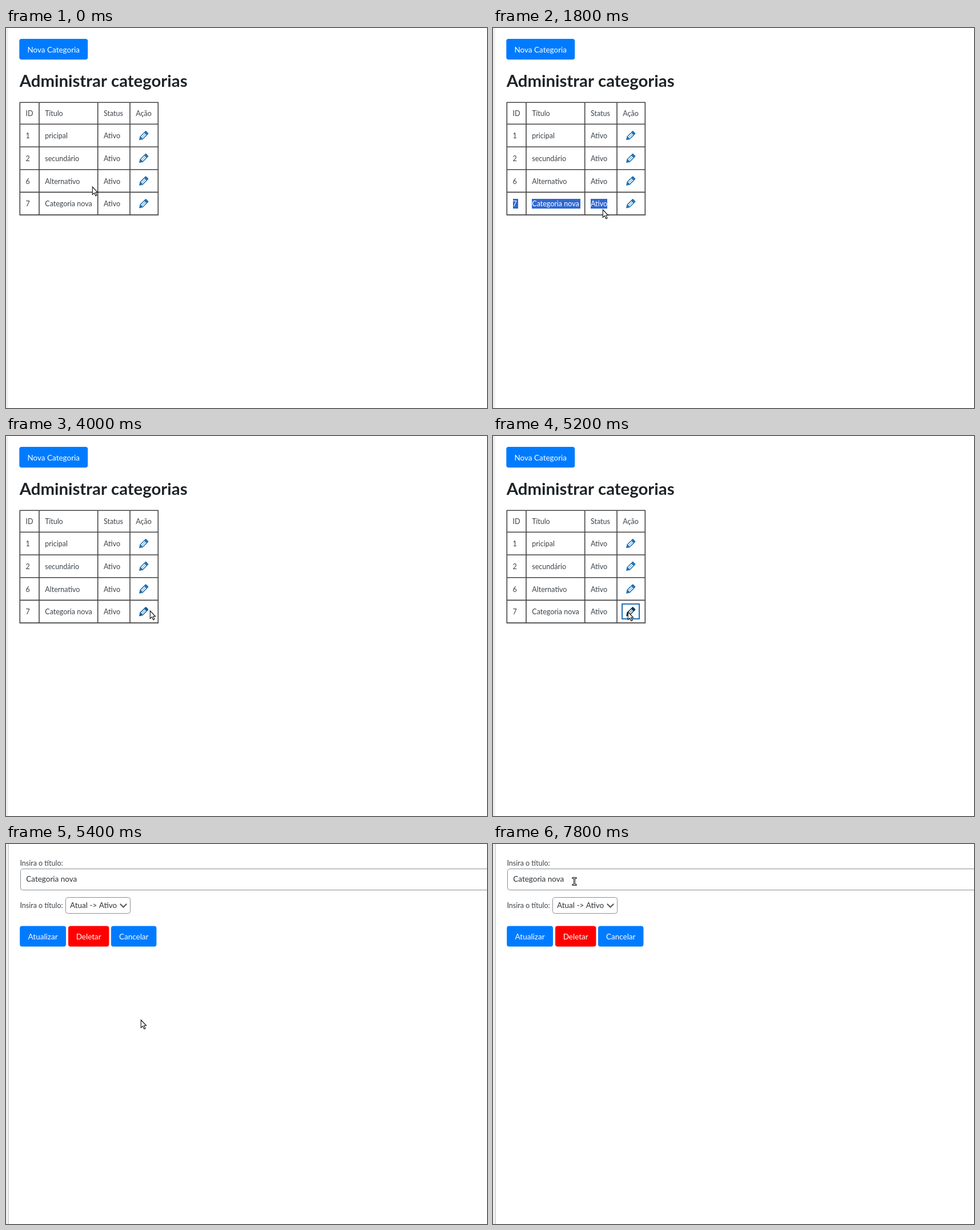
Recreate the animation shown at these times as an HTML page with a canvas. Size 842x665 px, loop 8000 ms.

```html
<!DOCTYPE html>
<html lang="pt">
<head>
<meta charset="utf-8">
<title>Administrar categorias</title>
<style>
html, body { margin: 0; width: 100%; height: 100%; overflow: hidden; background: #fff; }
canvas { display: block; }
</style>
</head>
<body>
<canvas id="stage" width="842" height="665"></canvas>
<script>
const ctx = document.getElementById('stage').getContext('2d');
const LOOP = 8000, STEP = 100, EDIT_AT = 5400;
const FAMILY = 'Lato, "Noto Sans", sans-serif';
const SMALL = `12.5px ${FAMILY}`, MEDIUM = `13.5px ${FAMILY}`, LARGE = `bold 29.35px ${FAMILY}`;
const BLUE = '#007bff', RED = '#ff0000', LINK = '#2271b1', INK = '#3c434a';
const LINE = '#444', SELECT = '#3068d0';

const ROWS = [
  ['ID', 'Título', 'Status', 'Ação'],
  ['1', 'pricipal', 'Ativo'],
  ['2', 'secundário', 'Ativo'],
  ['6', 'Alternativo', 'Ativo'],
  ['7', 'Categoria nova', 'Ativo']
];
const LAST = ROWS.length - 1;
const COL_LINES = [24.3, 58, 160.7, 217, 266.3];
const PAD = 10.3;
const rowLine = r => r ? 168.3 + 39.7 * (r - 1) : 130.3;
const baseline = r => Math.round(rowLine(r + 1) - 14.7);

const PENCIL = new Path2D('M13.89 3.39l2.71 2.72c.46.46.42 1.24.03 1.64l-8.01 8.02-5.56 1.16 1.16-5.58s7.6-7.63 7.99-8.03c.39-.39 1.22-.39 1.68.07zm-2.73 2.79l-5.59 5.61 1.11 1.11 5.54-5.65zm-2.97 8.23l5.58-5.6-1.07-1.08-5.59 5.6z');
const ARROW = new Path2D('M.5 .5V14L3.7 11.2 6 16.3 8.2 15.3 6 10.3H9.8Z');
const BEAM = new Path2D('M-2.5 -6H2.5M0 -6V6M-2.5 6H2.5');

// pointer moves: start, end, goal x, goal y
const HOME = [151, 278];
const MOVES = [
  [200, 1000, 29, 311],
  [1100, 1800, 192, 318],
  [2000, 2100, 183, 317],
  [2200, 2700, 82, 308],
  [2800, 3100, 131, 311],
  [3100, 3700, 243, 318],
  [3700, 4100, 254, 303],
  [4100, 4600, 236, 308],
  [5800, 6100, 273, 190],
  [6100, 6500, 55, 65],
  [6500, 6800, 148, 67],
  [6900, 7000, 118, 65],
  [7000, 7300, 49, 62],
  [7300, 7800, 142, 65]
];

const clamp = p => Math.min(1, Math.max(0, p));
const ease = p => p - Math.sin(2 * Math.PI * p) / (4 * Math.PI);

function pointer(t) {
  let pos = HOME;
  for (const [start, end, ...goal] of MOVES) {
    const p = ease(clamp((t - start) / (end - start)));
    pos = pos.map((v, i) => v + (goal[i] - v) * p);
  }
  return pos.map(Math.round);
}

function text(str, x, y, font, color) {
  ctx.font = font;
  ctx.fillStyle = color;
  ctx.fillText(str, x, y);
}

function rect(x, y, w, h, color) {
  ctx.fillStyle = color;
  ctx.fillRect(x, y, w, h);
}

function stroke(path, width, color) {
  ctx.lineWidth = width;
  ctx.strokeStyle = color;
  ctx.stroke(path);
}

function roundBox(x, y, w, h) {
  const box = new Path2D();
  box.roundRect(x, y, w, h, 4);
  return box;
}

function button(label, x, y, w, color) {
  ctx.fillStyle = color;
  ctx.fill(roundBox(x, y, w, 36.2));
  ctx.textAlign = 'center';
  text(label, x + w / 2, y + 23.5, MEDIUM, '#fff');
  ctx.textAlign = 'left';
}

function field(x, y, w, h) {
  stroke(roundBox(x + .5, y + .5, w - 1, h - 1), 1, '#8c8f94');
}

function pencil(y, color) {
  const size = 1.17;
  ctx.save();
  ctx.translate(241 - 9.9 * size, y - 9.95 * size);
  ctx.scale(size, size);
  ctx.fillStyle = color;
  ctx.fill(PENCIL);
  ctx.restore();
}

function table() {
  const [left, top] = [COL_LINES[0], rowLine(0)];
  const right = COL_LINES[4], bottom = rowLine(ROWS.length);
  const grid = new Path2D();
  for (const x of COL_LINES) {
    grid.moveTo(x, top);
    grid.lineTo(x, bottom);
  }
  for (let r = 0; r <= ROWS.length; r++) {
    grid.moveTo(left, rowLine(r));
    grid.lineTo(right, rowLine(r));
  }
  ctx.lineCap = 'square';
  stroke(grid, 1.6, LINE);
  ROWS.forEach((row, r) => row.forEach((str, c) =>
    text(str, COL_LINES[c] + PAD, baseline(r), SMALL, INK)));
}

// nearest letter edge to x
function snap(str, left, x) {
  let best = left;
  for (let n = 1; n <= str.length; n++) {
    const edge = left + ctx.measureText(str.slice(0, n)).width;
    if (Math.abs(edge - x) < Math.abs(best - x)) best = edge;
  }
  return best;
}

// below the text line the whole cell is taken
function selection(from, x, y) {
  const base = baseline(LAST);
  ctx.font = SMALL;
  ROWS[LAST].forEach((str, c) => {
    const left = COL_LINES[c] + PAD, right = left + ctx.measureText(str).width;
    if (x <= left || from >= right) return;
    const whole = y > 316 || x > COL_LINES[c + 1];
    const end = whole ? right + (c < 2 ? 2.4 : 0) : snap(str, left, x);
    const start = Math.round(snap(str, left, from)), w = Math.round(end) - start;
    if (w <= 0) return;
    ctx.save();
    ctx.beginPath();
    ctx.rect(start, base - 13, w, 17);
    ctx.clip();
    rect(start, base - 13, w, 17, SELECT);
    text(str, left, base, SMALL, '#fff');
    ctx.restore();
  });
}

function listPage(t, x, y) {
  button('Nova Categoria', 23.3, 19, 119.9, BLUE);
  text('Administrar categorias', 23.7, 103, LARGE, '#1d2327');
  table();

  const focused = t >= 5100, hover = t >= 3700 && x < 256;
  for (let r = 1; r <= LAST; r++) {
    const color = r < LAST ? LINK : focused ? '#043959' : hover ? '#135e96' : LINK;
    pencil(rowLine(r) + 19.9, color);
  }
  if (focused) {
    const ring = new Path2D();
    ring.rect(226, 294, 30, 26);
    stroke(ring, 2, LINK);
  }
  if (t >= 1200 && t < 2300) selection(30, x, y);
  if (t >= 2900 && t < 3400) selection(82, x, y);
}

function editPage() {
  rect(4, 0, 1, 665, '#c3c4c7');
  text('Insira o título:', 24.4, 38, SMALL, INK);
  field(25, 43, 830, 38);
  text('Categoria nova', 35.3, 66, MEDIUM, '#2c3338');
  text('Insira o título:', 24.4, 112, SMALL, INK);
  field(104, 93, 114, 29);
  text('Atual -> Ativo', 112, 112, MEDIUM, '#2c3338');
  stroke(new Path2D('M200.5 105.5l5 5 5-5'), 2, '#50575e');
  button('Atualizar', 24.2, 143.4, 80.8, BLUE);
  button('Deletar', 109, 143.4, 71.4, RED);
  button('Cancelar', 184, 143.4, 79.4, BLUE);
}

function isBeam(t, x, y) {
  if (t >= EDIT_AT) return y > 43 && y < 81;
  const [, title, status] = COL_LINES;
  return y > 297 && y < 317 && (x > title + PAD && x < 152 || x > status + PAD && x < 201);
}

function cursor(t, x, y) {
  ctx.save();
  if (isBeam(t, x, y)) {
    ctx.translate(x + .5, y + .5);
    ctx.lineCap = 'square';
    stroke(BEAM, 3, '#111');
    stroke(BEAM, 1, '#fff');
  } else {
    ctx.translate(x - .2, y - .5);
    ctx.fillStyle = '#fff';
    ctx.fill(ARROW);
    stroke(ARROW, 1.1, '#111');
  }
  ctx.restore();
}

function draw(now) {
  const t = Math.floor(now % LOOP / STEP) * STEP;
  const [x, y] = pointer(t);
  rect(0, 0, 842, 665, '#fff');
  rect(0, 0, 4, 665, '#f0f0f1');
  if (t < EDIT_AT) listPage(t, x, y);
  else editPage();
  cursor(t, x, y);
}

let start;
function tick(now) {
  start ??= now;
  draw(now - start);
  requestAnimationFrame(tick);
}
draw(0);
requestAnimationFrame(tick);
</script>
</body>
</html>
```
